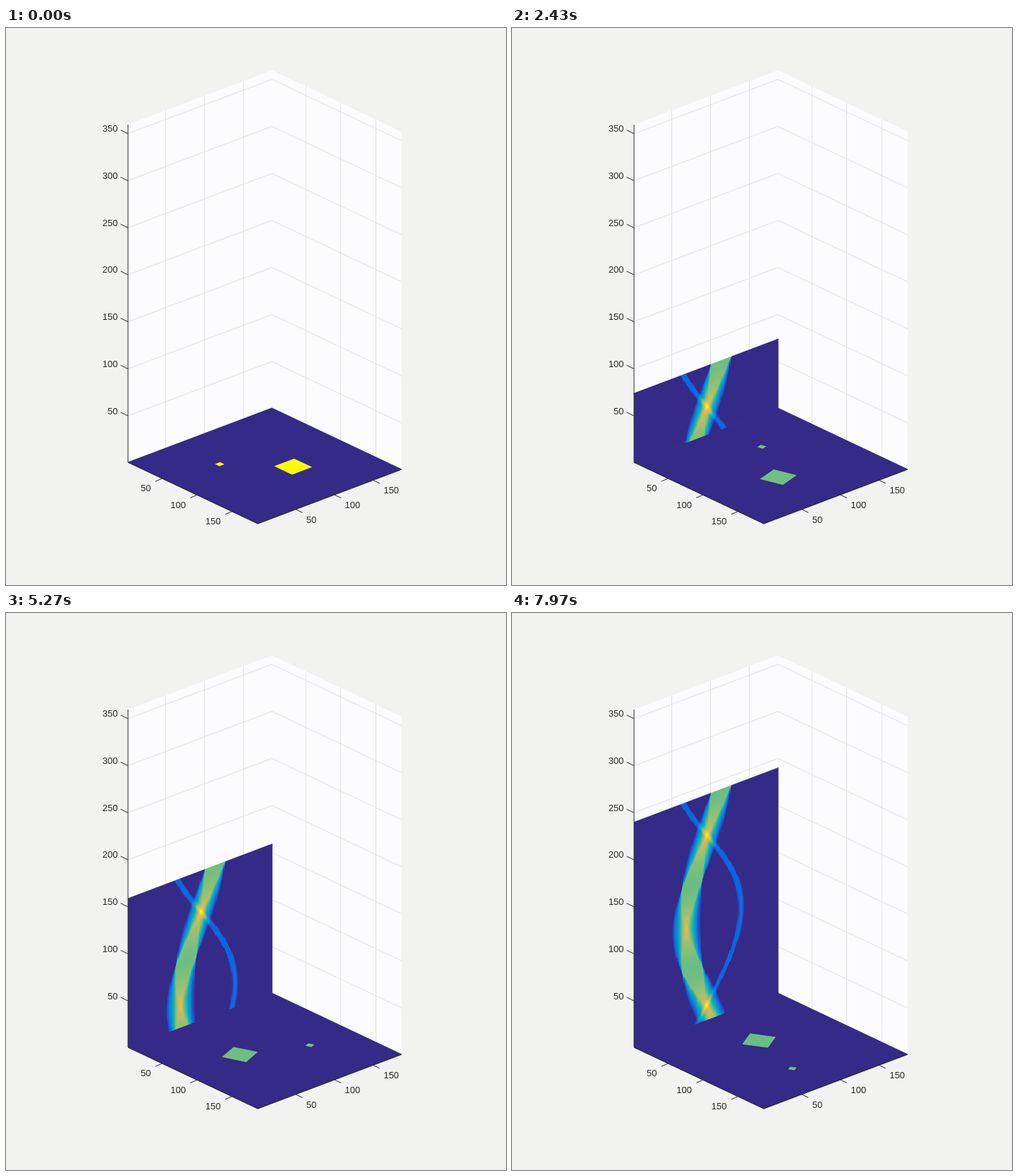
An HTML page with a canvas that plays this animation: 709x790 px, repeating every 8000 ms.

```html
<!DOCTYPE html>
<html lang="en">
<head>
<meta charset="utf-8">
<title>Projection of a rotating plane</title>
<style>
  html, body { margin: 0; width: 100%; height: 100%; overflow: hidden; background: #f2f2f1; }
  canvas, svg { position: absolute; left: 0; top: 0; display: block; }
  text { font: 13px "Liberation Sans", Arial, sans-serif; fill: #262626; }
  .axis { fill: none; stroke: #262626; stroke-width: 1; }
</style>
</head>
<body>
<canvas id="wall" width="709" height="790"></canvas>
<svg id="front" width="709" height="790" viewBox="0 0 709 790"></svg>
<script>
const LOOP = 8000, STEPS = 240, N = 186, TOP = 359;
const LEFT = [173, 616], BACK = [377, 539], RIGHT = [561, 626], FRONT = [357, 703];
const ROW = 479 / TOP;                     // pixels per unit of height
const U = [184 / N, 87 / N], V = [204 / N, -77 / N];
const MID = [367, 621];
const PIVOT = 0.65;                        // turning point, off the middle on both axes
const SQUARES = [
  { u: 18.65, v: 18.5, h: 12.9 },
  { u: -32.2, v: -30.5, h: 3.25 }
];
const COLORS = ('352a87 353dad 2053d4 0268e1 0d75dc 1481d6 108ed2 079ccf 06a7c6 0faeb9 25b5a9 ' +
  '42bb98 65be86 87bf77 a5be6b c0bc60 d9ba56 f1b94a ffc337 fad32a f5e41d f9fb0e')
  .split(' ').map(c => [0, 2, 4].map(i => parseInt(c.slice(i, i + 2), 16)));

function color(x) {
  const p = Math.max(0, Math.min(1, x)) * (COLORS.length - 1);
  const i = Math.min(COLORS.length - 2, Math.floor(p));
  return COLORS[i].map((a, n) => a + (COLORS[i + 1][n] - a) * (p - i));
}

function turn(u, v, deg) {
  const a = deg * Math.PI / 180, c = Math.cos(a), s = Math.sin(a);
  return [PIVOT + u * c + v * s, PIVOT + v * c - u * s];
}

// Length of the line at v through a turned square.
function chord(sq, deg, v) {
  const a = deg * Math.PI / 180;
  const c = Math.abs(Math.cos(a)), s = Math.abs(Math.sin(a));
  const big = Math.max(c, s), small = Math.min(c, s);
  const d = Math.abs(v - turn(sq.u, sq.v, deg)[1]);
  if (d <= sq.h * (big - small)) return 2 * sq.h / big;
  if (d >= sq.h * (big + small)) return 0;
  return (sq.h * (big + small) - d) / (big * small);
}

const rows = [], peaks = [];
for (let k = 0; k < STEPS; k++) {
  const row = new Float32Array(N);
  let peak = k ? peaks[k - 1] : 1;
  for (let j = 0; j < N; j++) {
    const v = j + 0.5 - N / 2;
    row[j] = SQUARES.reduce((sum, sq) => sum + chord(sq, k, v), 0) / (2 * SQUARES[0].h);
    peak = Math.max(peak, row[j]);
  }
  rows.push(row);
  peaks.push(peak);
}

const svg = document.getElementById('front');
function add(tag, attrs, text) {
  const el = document.createElementNS('http://www.w3.org/2000/svg', tag);
  for (const key in attrs) el.setAttribute(key, attrs[key]);
  if (text !== undefined) el.textContent = text;
  svg.appendChild(el);
  return el;
}
const points = list => list.map(p => p.map(n => n.toFixed(2)).join()).join(' ');

const shapes = SQUARES.map(() => add('polygon', {}));
add('path', { class: 'axis', d: 'M173 137V616L357 703L561 626' });

function tick(x, y, dx, dy, label, tx, ty, anchor) {
  add('line', { class: 'axis', x1: x, y1: y, x2: x + dx, y2: y + dy });
  add('text', { x: x + tx, y: Math.round(y + ty), 'text-anchor': anchor }, label);
}
for (let n = 50; n <= 350; n += 50) {
  const d = n - 1;
  tick(173, 615.5 - d * ROW, -10.5, -5, n, -14.5, -2.5, 'end');
  if (n > 150) continue;
  tick(LEFT[0] + d * U[0], LEFT[1] + d * U[1], -9.5, 4, n, -16, 18.5, 'end');
  tick(FRONT[0] + d * V[0], FRONT[1] + d * V[1], 9.5, 4.5, n, 15, 19, 'start');
}

const ctx = document.getElementById('wall').getContext('2d');
const sheet = document.createElement('canvas');
sheet.width = N;
sheet.height = STEPS;
const sheetCtx = sheet.getContext('2d');
const pixels = sheetCtx.createImageData(N, STEPS);

function trace(list) {
  ctx.beginPath();
  list.forEach(p => ctx.lineTo(p[0], p[1]));
}

function drawBox() {
  const h = TOP * ROW;
  ctx.fillStyle = '#f2f2f1';
  ctx.fillRect(0, 0, 709, 790);
  ctx.fillStyle = '#fcfcff';
  trace([LEFT, BACK, RIGHT, [561, RIGHT[1] - h], [377, BACK[1] - h], [173, LEFT[1] - h]]);
  ctx.fill();
  ctx.strokeStyle = '#e3e3e7';
  ctx.lineWidth = 1;
  for (let n = 50; n <= 350; n += 50) {
    const d = n - 1, z = d * ROW;
    trace([LEFT, BACK, RIGHT].map(p => [p[0], p[1] - z - 0.5]));
    ctx.stroke();
    if (n > 150) continue;
    [[LEFT, V], [BACK, U]].forEach(([p, e]) => {
      const x = Math.floor(p[0] + d * e[0]) + 0.5, y = p[1] + d * e[1];
      trace([[x, y], [x, y - h]]);
      ctx.stroke();
    });
  }
  ctx.fillStyle = ctx.strokeStyle = '#352a87';
  trace([LEFT, BACK, RIGHT, FRONT]);
  ctx.closePath();
  ctx.fill();
  ctx.stroke();
}

function drawWall(k) {
  if (!k) return;
  for (let r = 0, i = 0; r < k; r++) {
    for (let j = 0; j < N; j++, i += 4) {
      const rgb = color(rows[r + 1][j] / peaks[k]);
      pixels.data[i] = rgb[0];
      pixels.data[i + 1] = rgb[1];
      pixels.data[i + 2] = rgb[2];
      pixels.data[i + 3] = 255;
    }
  }
  sheetCtx.putImageData(pixels, 0, 0);
  // Edges reach out to whole pixels, which also closes the seam with the floor.
  ctx.save();
  ctx.imageSmoothingEnabled = false;
  ctx.setTransform(1, V[1] / V[0], 0, 1, LEFT[0], LEFT[1] - k * ROW - 0.8);
  ctx.drawImage(sheet, 0, 0, N, k, 0, 0, N * V[0] + 0.8, k * ROW + 1);
  ctx.restore();
}

function drawSquares(k) {
  const fill = `rgb(${color(1 / peaks[k]).map(Math.round)})`;
  SQUARES.forEach((sq, i) => {
    const corners = [[-1, -1], [-1, 1], [1, 1], [1, -1]].map(([a, b]) => {
      const [u, v] = turn(sq.u + a * sq.h, sq.v + b * sq.h, k);
      return [MID[0] + u * U[0] + v * V[0], MID[1] + u * U[1] + v * V[1]];
    });
    shapes[i].setAttribute('points', points(corners));
    shapes[i].setAttribute('fill', fill);
  });
}

let shown = -1;
function render(ms) {
  // One degree per step, 30 steps a second on a 10 ms clock.
  const k = Math.min(STEPS - 1, Math.floor((Math.floor(ms % LOOP / 10) + 0.5) * 0.3));
  if (k === shown) return;
  shown = k;
  drawBox();
  drawWall(k);
  drawSquares(k);
}

const start = performance.now();
function loop() {
  render(performance.now() - start);
  requestAnimationFrame(loop);
}
loop();
</script>
</body>
</html>
```
